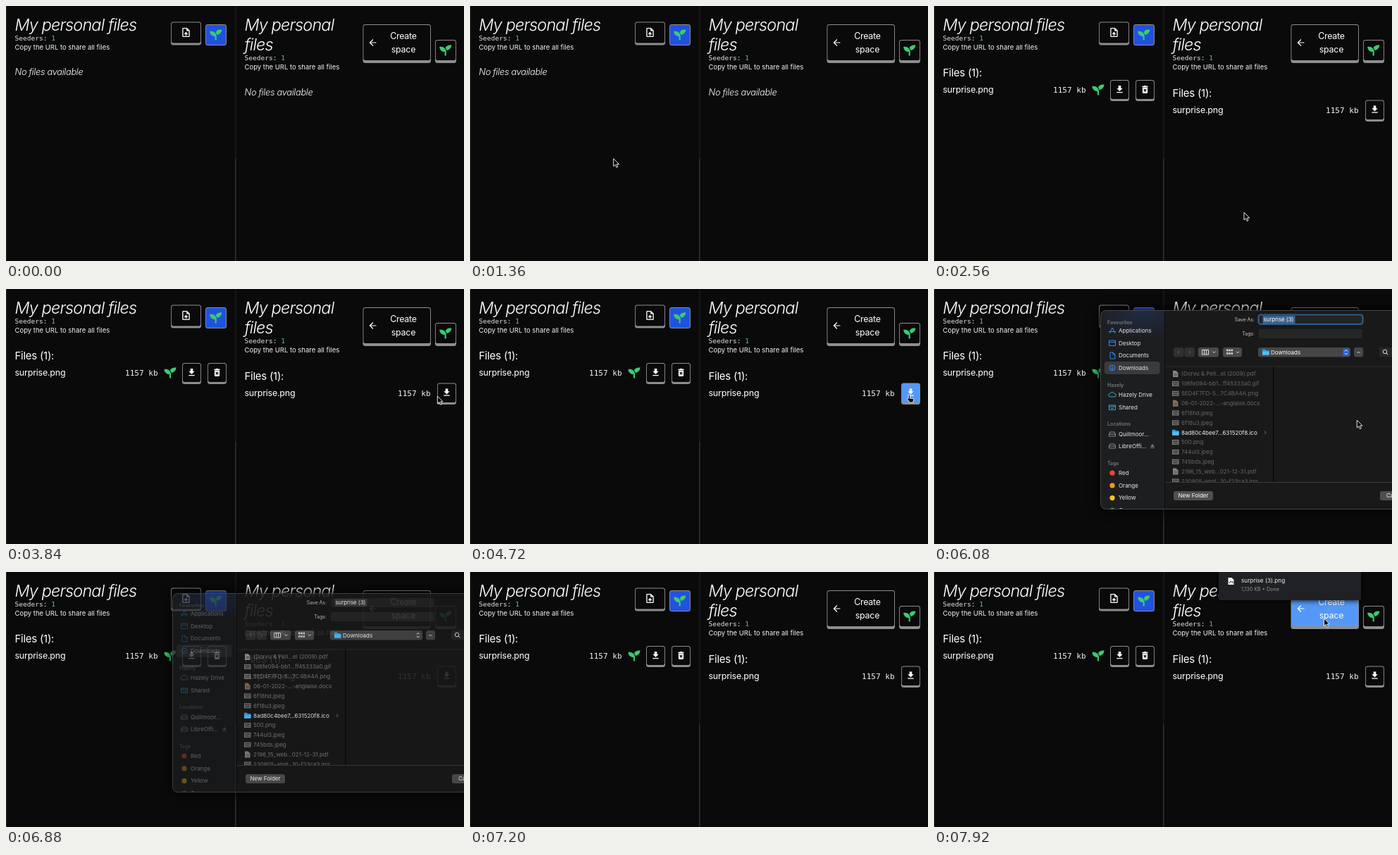
An HTML page for the animation above (8000 ms loop, 650 by 362 pixels).

```html
<!DOCTYPE html>
<html lang="en">
<head>
<meta charset="utf-8">
<title>Sharing files</title>
<style>
html, body { margin: 0; width: 100%; height: 100%; overflow: hidden; background: #0a0a0a; }
svg { display: block; width: 100vw; height: 100vh; }
text { font-family: Inter, "Open Sans", sans-serif; font-optical-sizing: none; white-space: pre; }
.mono { font-family: "DejaVu Sans Mono", monospace; }
.title { font-style: italic; font-weight: 300; letter-spacing: -.035em; }
.note { font-style: italic; font-weight: 300; letter-spacing: -.024em; }
.body { letter-spacing: -.018em; }
</style>
</head>
<body>
<svg id="stage" viewBox="0 0 650 362"></svg>
<script>
const LOOP = 8000, STEP = 80;
const stage = document.getElementById('stage');

const ICON = {
  seed: 'M64 96H0c0 124 100 224 224 224v144c0 9 7 16 16 16h32c9 0 16-7 16-16V320C288 196 188 96 64 96zM448 32c-84 0-157 46-196 115 28 30 48 67 59 108C424 243 512 148 512 32z',
  down: 'M5 20h14v-2H5zM19 9h-4V3H9v6H5l7 7z',
  bin: 'M6 19c0 1.1.9 2 2 2h8c1.1 0 2-.9 2-2V7H6zm2.5-7.1 1.4-1.4 2.1 2.1 2.1-2.1 1.4 1.4-2.1 2.1 2.1 2.1-1.4 1.4-2.1-2.1-2.1 2.1-1.4-1.4 2.1-2.1zM15.5 4l-1-1h-5l-1 1H5v2h14V4z',
  upload: 'M14 2H6a2 2 0 0 0-2 2v16a2 2 0 0 0 2 2h12a2 2 0 0 0 2-2V8zm4 18H6V4h7v5h5zM8 15l1.4 1.4 1.6-1.6V19h2v-4.2l1.6 1.6L16 15l-4-4z',
  back: 'M20 11H7.8l5.6-5.6L12 4l-8 8 8 8 1.4-1.4L7.8 13H20z'
};

const text = (x, y, s, size, fill = '#fff', more = '') =>
  `<text x="${x}" y="${y}" font-size="${size}" fill="${fill}" ${more}>${s}</text>`;
const rect = (x, y, w, h, fill, r = 0, more = '') =>
  `<rect x="${x}" y="${y}" width="${w}" height="${h}" rx="${r}" fill="${fill}" ${more}/>`;
const line = (d, color, w = 1, more = '') =>
  `<path d="${d}" fill="none" stroke="${color}" stroke-width="${w}" ${more}/>`;
const icon = (name, cx, cy, k) =>
  `<path d="${ICON[name]}" fill="#fff" fill-rule="evenodd" transform="translate(${cx} ${cy}) scale(${k}) translate(-12 -12)"/>`;
const seed = (x, y) =>
  `<path d="${ICON.seed}" fill="#3ccb70" transform="translate(${x} ${y}) scale(.0332)"/>`;
const button = (x, y, w, h, lip = 3, fill = '#0a0a0a', id = '') =>
  rect(x, y, w, h, '#8e8e8e', 3.5) +
  rect(x + .9, y + .9, w - 1.8, h - .9 - lip, fill, 2.8, id && `id="${id}"`);

// Page
function header(x, titleRows, dy) {
  return titleRows.map((s, i) => text(x, 35 + 28 * i, s, 23.4, '#fff', 'class="title"')).join('') +
    text(x, 48.7 + dy, 'Seeders: <tspan fill="#52c4a6">1</tspan>', 9.55, '#e2e2e2', 'class="mono"') +
    text(x, 62 + dy, 'Copy the URL to share all files', 9.5, '#f2f2f2');
}

function files(id, x, dy, sizeX) {
  return `<g id="${id}None">${text(x, 98 + dy, 'No files available', 12.8, '#fff', 'class="note"')}</g>` +
    `<g id="${id}List">` +
    text(x, 100 + dy, 'Files (1):', 15, '#fff', 'class="body"') +
    text(x, 123 + dy, 'surprise.png', 12.5, '#fff', 'class="body"') +
    text(sizeX, 123 + dy, '1157 kb', 11.05, '#f2f2f2', 'class="mono"') +
    (id === 'left'
      ? seed(224.5, 110.5) + button(250, 105, 27, 30) + icon('down', 263.5, 118.5, .6) +
        button(286, 105, 27, 30) + icon('bin', 299.5, 118.5, .6)
      : button(612, 133.5, 27, 30.5, 3, '#0a0a0a', 'saveFill') + icon('down', 625.5, 147, .6)) +
    '</g>';
}

const page =
  rect(0, 0, 650, 362, '#0a0a0a') +
  rect(0, 0, 1, 362, '#2a2a2a') +
  rect(325.5, 0, 1, 216, '#222') + rect(325, 216, 1.5, 146, '#303030') +
  header(12.5, ['My personal files'], 0) +
  button(234, 22.5, 43, 33) + icon('upload', 255.5, 37.5, .66) +
  button(283, 26, 30, 30, 1, '#2052e0') + seed(289.2, 32.5) +
  files('left', 12.5, 0, 169) +
  header(338.5, ['My personal', 'files'], 28.3) +
  button(506.5, 26, 96.5, 55, 4, '#0a0a0a', 'createFill') + icon('back', 520.5, 52, .62) +
  ['Create', 'space'].map((s, i) =>
    text(564, 47 + 19 * i, s, 12.4, '#fff', 'class="body" text-anchor="middle"')).join('') +
  button(609, 48, 30, 33, 4) + seed(615.2, 54.5) +
  files('right', 338.5, 28.5, 556);

// Save dialog
const BLUE = '#2d8cf0';
const folder = (x, y) =>
  `<path d="M${x} ${y - 4}h4l1 1.5h4.5v6.5h-9.5z" fill="#2f9fe8"/>` + rect(x, y - 1, 9.5, 5, '#52bdf5', .5);

const glyphs = [
  [59, 'M249 63l4-8 4 8M248 60.5h10'],
  [77, 'M248.5 73h9v7.5h-9zM248.5 75.5h9'],
  [94, 'M250 90h4l3 3v6h-7zM254 90v3h3'],
  [112, 'M257 112a4 4 0 1 1-8 0a4 4 0 1 1 8 0M253 109.5v5M251 112.5l2 2 2-2'],
  [150, 'M250 153a2.2 2.2 0 0 1 0-4.5a3.2 3.2 0 0 1 6 0a2.2 2.2 0 0 1 0 4.5z'],
  [168, 'M248.5 165h9v6.5h-9zM248.5 167h9M251 169.5h4'],
  [206, 'M248.5 206l1.5-3h6l1.5 3v3h-9zM248.5 206h9'],
  [223, 'M248.5 223l1.5-3h6l1.5 3v3h-9zM248.5 223h9']
];
const places = ['Applications', 'Desktop', 'Documents', 'Downloads', 'Hazely Drive', 'Shared', 'Quillmoor...', 'LibreOffi...'];
const tags = [['Red', '#ef4438'], ['Orange', '#f0991b'], ['Yellow', '#f6c61c'], ['Green', '#43c04c']];
const groups = [['Favourites', 47], ['Hazely', 136], ['Locations', 191.5], ['Tags', 247]];
const rows = [
  '(Dorvu &amp; Pell...el (2009).pdf', '1d6fe094-bb1...ff45333a0.gif', '5ED4F7FD-5...7C4BA4A.png',
  '06-01-2022-...-anglaise.docx', '6f18hd.jpeg', '6f18u3.jpeg', '8ad80c4bee7...631520f8.ico',
  '500.png', '744ul3.jpeg', '745bds.jpeg', '2196_15_web...021-12-31.pdf', '230805-angl...10-f23ca3.jpg'
];

const sidebar =
  groups.map(([s, y]) => text(246, y + 2.5, s, 7, '#77797b', 'font-weight="600"')).join('') +
  rect(242, 103, 78.5, 18, '#3a3b3e', 4) +
  places.map((s, i) => {
    const [y, d] = glyphs[i];
    return line(d, i > 5 ? '#8b8d90' : i > 3 ? '#35a8d0' : BLUE) + text(262, y + 3, s, 8, '#e8e8e8');
  }).join('') +
  '<path d="M307 224h6l-3-4zM307 225h6v1h-6z" fill="#77797b"/>' +
  tags.map(([s, c], i) => `<circle cx="253" cy="${261.2 + 17.7 * i}" r="3.6" fill="${c}"/>` +
    text(262, 264 + 17.7 * i, s, 8, '#e8e8e8')).join('');

function fileRow(s, i) {
  const y = 120.6 + 13.85 * i;
  if (i === 6) return folder(338, y) + text(351, y + 2.8, s, 8, '#f4f4f4') +
    line(`M469 ${y - 2}l2 2-2 2`, '#888');
  const doc = /pdf|docx/.test(s);
  const art = doc
    ? `<path d="M339 ${y - 4.5}h4.5l3 3v6h-7.5z" fill="${s.endsWith('x') ? '#8c6f5c' : '#858585'}"/>` +
      line(`M340.5 ${y}h4.5M340.5 ${y + 2}h4.5`, '#444', .8)
    : rect(338, y - 3.5, 9.5, 7, '#858585') + rect(339, y - 2.5, 7.5, 5, '#3d3d3d') +
      line(`M339 ${y + 2}l2.5-3 2 2 1.5-1.5 1.5 2`, '#858585');
  return art + text(351, y + 2.8, s, 8, 'inherit');
}

const chevron = (x, y, color = '#ddd') => line(`M${x - 2} ${y - 1}l2 2 2-2`, color);
const dialog =
  `<g id="dialog"><g mask="url(#outside)">${rect(236, 30, 560, 283, '#000', 8, 'filter="url(#shade)"')}</g>` +
  '<g clip-path="url(#sheet)">' +
  `<g id="sideBack">${rect(236, 30, 92, 283, '#1d1e20')}${rect(236, 30, 92, 50, 'url(#glow)')}</g>` +
  rect(327.5, 30, 470, 283, '#191919') +
  `<g id="side">${sidebar}</g>` +
  rect(327, 30, 1, 283, '#0c0c0c') +
  text(455, 46, 'Save As:', 6.9, '#c8c8c8', 'text-anchor="end"') +
  text(455, 66, 'Tags:', 6.9, '#c8c8c8', 'text-anchor="end"') +
  rect(461, 37, 147, 13, '#242424', 2) + rect(461, 57, 147, 13, '#262626', 2) +
  rect(460.5, 36.5, 148, 13.5, 'none', 3.5, 'id="ring" stroke="#2d5d8d" stroke-width="2.2"') +
  rect(466.5, 38, 46, 11, '#3f638b', 0, 'id="pick"') + text(467.5, 46.2, 'surprise (3)', 7.8) +
  rect(340, 83, 14.5, 13.5, '#303030', 3) + rect(355.5, 83, 14.5, 13.5, '#303030', 3) +
  line('M348.5 87l-2.5 2.7 2.5 2.7M361.5 87l2.5 2.7-2.5 2.7', '#626262') +
  rect(375, 83, 29, 13.5, '#4a4a4a', 3) + rect(410, 83, 27, 13.5, '#4a4a4a', 3) +
  line('M380.5 86.5h9v6.5h-9zM383.5 86.5v6.5M386.5 86.5v6.5', '#ddd') + chevron(397.5, 89.7) +
  line('M415 87h9M415 91.5h9', '#ddd', 2.5, 'stroke-dasharray="2.4 .9"') + chevron(431, 89.7) +
  rect(460, 83, 131, 13.5, '#464646', 3) + folder(466, 89.7) + text(478, 92.6, 'Downloads', 8) +
  rect(580, 84.5, 9.5, 10.5, '#2463d0', 2.5, 'id="stepper"') +
  line('M582.8 88.5l2-2 2 2M582.8 91l2 2 2-2', '#fff') +
  rect(596, 83, 13, 13.5, '#464646', 3) + line('M600.5 91l2-2 2 2', '#ddd') +
  rect(632, 83, 100, 13.5, '#262626', 3) +
  '<circle cx="640" cy="89" r="2.8" fill="none" stroke="#ddd"/>' + line('M642 91l2.5 2.5', '#ddd') +
  rect(328, 109.5, 330, 1, '#303030') + rect(481, 110, 1.3, 164, '#080808') +
  `<g id="rows" clip-path="url(#list)">${rows.map(fileRow).join('')}</g>` +
  rect(328, 274, 330, 1, '#3a3a3a') +
  rect(340, 287, 56, 13, '#4f4f4f', 3) + text(368, 296.3, 'New Folder', 8, '#fff', 'text-anchor="middle"') +
  rect(633, 287, 56, 13, '#4f4f4f', 3) + text(642, 296.3, 'Cancel', 8) +
  '</g>' + rect(236.5, 30.5, 560, 282, 'none', 8, 'stroke="#454545"') + '</g>';

const bubble = '<g id="bubble">' +
  rect(404, -20, 202, 60, '#000', 3, 'filter="url(#soft)"') + rect(404, -20, 202, 60, '#202124', 2) +
  '<path d="M417.5 8h5l3 3v7h-8z" fill="#f2f2f2"/>' +
  line('M419 16l2-3 1.5 1.5 1-1 1 2.5', '#202124') +
  text(436, 15, 'surprise (3).png', 8.2, '#f0f0f0') + text(436, 26.6, '1,130 KB • Done', 7.2, '#8e9196') + '</g>';

const pointer =
  '<path id="arrow" d="M0 0V10.8l2.5-2.3 1.7 3.9 1.8-.8-1.7-3.7h3.5z" fill="#000" stroke="#fff" stroke-width=".9"/>' +
  '<path id="hand" d="M-2 5.5c-1.5-1.2-2.3 0-1.3 1.2l2.7 4.3h5l1-4.5c.3-1.5-1.3-1.8-1.6-.6-.2-1.3-1.7-1.3-1.8-.2-.2-1.2-1.7-1.2-1.8 0V1c0-1.4-2.2-1.4-2.2 0z" fill="#000" stroke="#fff" stroke-width=".9"/>';

stage.innerHTML = `<defs>
  <filter id="shade" x="-10%" y="-15%" width="120%" height="130%"><feGaussianBlur stdDeviation="9"/></filter>
  <filter id="soft" x="-10%" y="-30%" width="120%" height="160%"><feGaussianBlur stdDeviation="4"/></filter>
  <radialGradient id="glow" cx=".65" cy="0" r=".8">
    <stop offset="0" stop-color="#22375f" stop-opacity=".6"/><stop offset="1" stop-color="#22375f" stop-opacity="0"/>
  </radialGradient>
  <mask id="outside" maskUnits="userSpaceOnUse" x="0" y="0" width="650" height="362">
    ${rect(0, 0, 650, 362, '#fff')}${rect(236, 30, 560, 283, '#000', 8)}
  </mask>
  <clipPath id="sheet"><rect x="236" y="30" width="560" height="283" rx="8"/></clipPath>
  <clipPath id="list"><rect x="328" y="110" width="153" height="164"/></clipPath>
</defs>${page}${dialog}${bubble}<g id="pointer">${pointer}</g>`;

// Motion
const el = {};
stage.querySelectorAll('[id]').forEach(n => el[n.id] = n);
const show = (n, on) => n.setAttribute('display', on ? 'inline' : 'none');
const set = (n, k, v) => n.setAttribute(k, v);
const ramp = (t, a, b) => Math.min(1, Math.max(0, (t - a) / (b - a)));
const ease = p => p * p * (3 - 2 * p);
const blend = p => `rgb(${[84, 152, 247].map(c => Math.round(10 + (c - 10) * p))})`;

// time, x, y
const path = [
  [480, 618, 302], [1040, 172, 250], [1280, 203.7, 216.7], [1760, 203.7, 216.7], [2160, 299, 257],
  [2320, 299, 257], [2560, 440, 293], [2640, 497, 280], [2720, 497, 280], [2880, 548, 253],
  [3120, 548, 253], [3840, 612.3, 152], [4000, 612.3, 152], [4320, 624.3, 150],
  [5760, 624.3, 150], [6560, 556, 253], [7520, 556, 258], [7920, 553.5, 66]
];
function place(t) {
  const i = path.findIndex(p => p[0] >= t);
  if (i < 1) return path[i ? path.length - 1 : 0].slice(1);
  const [a, b] = [path[i - 1], path[i]], p = ease(ramp(t, a[0], b[0]));
  return [a[1] + (b[1] - a[1]) * p, a[2] + (b[2] - a[2]) * p];
}

function draw(t) {
  for (const [id, at] of [['left', 1440], ['right', 1520]]) {
    show(el[id + 'None'], t < at);
    show(el[id + 'List'], t >= at);
  }
  const [x, y] = place(t);
  const onSave = t >= 4160 && t < 5120;
  set(el.pointer, 'transform', `translate(${x} ${y})`);
  show(el.pointer, t >= 480 && t < 6640 || t >= 7600);
  show(el.arrow, !onSave);
  show(el.hand, onSave);
  set(el.saveFill, 'fill', blend(onSave ? ramp(t, 4080, 4320) : 0));
  set(el.createFill, 'fill', blend(t >= 7680 && y < 81 ? 1 : 0));

  const open = ease(ramp(t, 4880, 5200)), shut = ramp(t, 6800, 7200);
  const active = t < 6720;
  set(el.dialog, 'opacity', open * (1 - ease(shut)));
  show(el.dialog, t > 4880 && shut < 1);
  set(el.side, 'opacity', active ? 1 : .4);
  set(el.sideBack, 'opacity', active ? 1 : .82);
  show(el.ring, active);
  set(el.pick, 'fill', active ? '#3f638b' : '#3c3c3c');
  set(el.stepper, 'fill', active ? '#2463d0' : '#464646');
  set(el.rows, 'fill', active ? '#666' : '#7c7c7c');

  const pop = ramp(t, 7200, 7440);
  set(el.bubble, 'opacity', pop);
  show(el.bubble, pop > 0);
}

const start = performance.now();
function tick() {
  const t = (performance.now() - start) % LOOP;
  draw(Math.floor(t / STEP) * STEP);
  requestAnimationFrame(tick);
}
tick();
</script>
</body>
</html>
```
